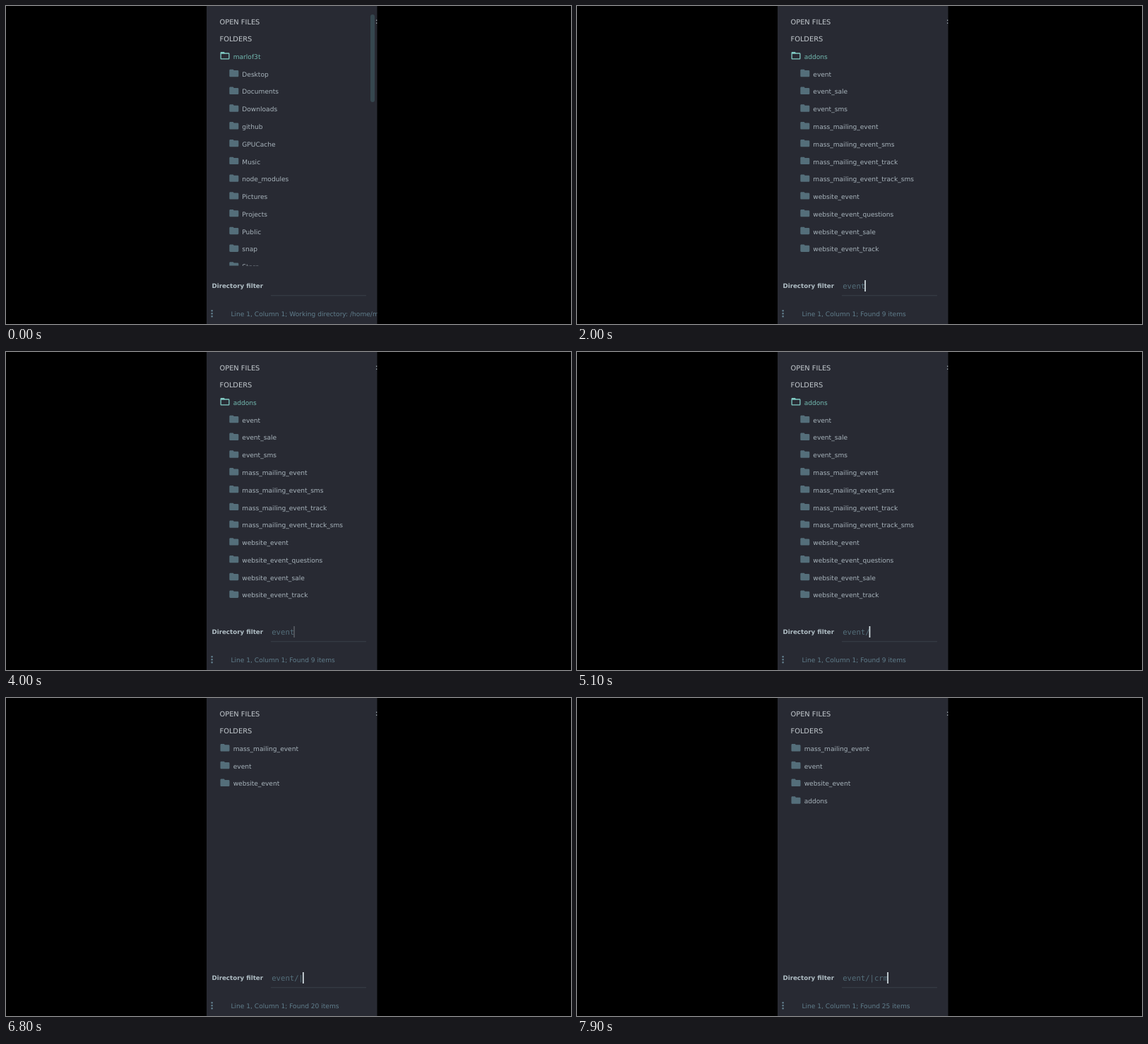
An HTML page with a canvas for the animation above (8 s loop, 800 px wide and 450 px high).

```html
<!DOCTYPE html>
<html lang="en">
<head>
<meta charset="utf-8">
<title>Directory filter</title>
<style>
  html, body { margin: 0; height: 100%; overflow: hidden; background: #000; }
  canvas { display: block; }
</style>
</head>
<body>
<canvas id="stage" width="800" height="450"></canvas>
<script>
const ctx = document.getElementById('stage').getContext('2d');
const LOOP = 8000, STEP = 100;
const ROW = 24.77, FIRST_ROW = 22;
const SANS = '"DejaVu Sans", sans-serif';
const MONO = '"DejaVu Sans Mono", monospace';
const CHAR_WIDTH = 6.4, INPUT_X = 376.2;

const tabShape = 'M10 4H4c-1.1 0-2 .9-2 2v12c0 1.1.9 2 2 2h16c1.1 0 2-.9 2-2V8c0-1.1-.9-2-2-2h-8z';
const closedFolder = new Path2D(tabShape);
const openFolder = new Path2D(tabShape + 'M20 18H4V8h16z');

const eventFolders = ['event', 'event_sale', 'event_sms', 'mass_mailing_event',
  'mass_mailing_event_sms', 'mass_mailing_event_track', 'mass_mailing_event_track_sms',
  'website_event', 'website_event_questions', 'website_event_sale', 'website_event_track'];
const matches = ['mass_mailing_event', 'event', 'website_event'];

// Sidebar contents, each valid from its start time
const views = [
  { at: 0, root: 'marlof3t', scroll: true, status: 'Working directory: /home/marlof3t',
    items: ['Desktop', 'Documents', 'Downloads', 'github', 'GPUCache', 'Music',
      'node_modules', 'Pictures', 'Projects', 'Public', 'snap', 'Store'] },
  { at: 1700, root: 'addons', items: eventFolders, status: 'Found 9 items' },
  { at: 5200, items: matches, status: 'Found 20 items' },
  { at: 6900, scroll: true, status: 'Found 97 items',
    items: [...matches, 'addons', ...eventFolders.filter(name => !matches.includes(name))] },
  { at: 7800, items: [...matches, 'addons'], status: 'Found 25 items' },
];

const typed = 'event/|crm';
const keyTimes = [1200, 1300, 1400, 1600, 1700, 5100, 6700, 7300, 7500, 7700];

function text(str, x, y, size, color, family = SANS, weight = '') {
  ctx.font = `${weight} ${size}px ${family}`;
  ctx.fillStyle = color;
  ctx.fillText(str, x, y);
}

function rect(x, y, w, h, color, radius = 0) {
  ctx.fillStyle = color;
  ctx.beginPath();
  ctx.roundRect(x, y, w, h, radius);
  ctx.fill();
}

function folder(name, row, depth, open) {
  const y = FIRST_ROW + row * ROW;
  ctx.save();
  ctx.translate(302.2 + depth * 12.8, y - 9.1);
  ctx.scale(0.65, 0.65);
  ctx.fillStyle = open ? '#80cbc4' : '#546e7a';
  ctx.fill(open ? openFolder : closedFolder, 'evenodd');
  ctx.restore();
  text(name, 321.7 + depth * 12.6, y + 3.4, 9.08, open ? '#72b8af' : '#a7b3bb');
}

// Smooth blink that restarts at full strength with every key
function caretOpacity(sinceKey) {
  const wave = 0.5 + 0.9 * Math.cos((sinceKey - 250) / 1200 * 2 * Math.PI);
  return sinceKey >= 0 && sinceKey < 250 ? 1 : Math.min(1, Math.max(0, wave));
}

function drawSidebar(view) {
  text('OPEN FILES', 302.5, 25.6, 9.84, '#c3c9ce');
  text('FOLDERS', 302.5, 50.4, 9.84, '#c3c9ce');
  ctx.save();
  ctx.beginPath();
  ctx.rect(284, 0, 242, 367.6);
  ctx.clip();
  const depth = view.root ? 1 : 0;
  if (view.root) folder(view.root, 2, 0, true);
  view.items.forEach((name, i) => folder(name, 2 + depth + i, depth, false));
  ctx.restore();
  if (view.scroll) rect(516, 12, 6, 124, '#35474f', 3);
  for (const y of [19.5, 23.5]) rect(524, y, 1.5, 1.5, '#9aa5ac');
}

function drawInput(t) {
  const count = keyTimes.filter(at => at <= t).length;
  const lastKey = count ? keyTimes[count - 1] : -1000;
  text('Directory filter', 291.4, 399.4, 8.72, '#b0bec5', SANS, 'bold');
  rect(375, 409.3, 135, 1, '#3a3f48');
  text(typed.slice(0, count), INPUT_X, 400, CHAR_WIDTH / 0.602, '#546e7a', MONO);
  ctx.globalAlpha = caretOpacity(t - lastKey);
  rect(INPUT_X - 1 + count * CHAR_WIDTH, 388, 1.7, 16, '#d5e0e5');
  ctx.globalAlpha = 1;
}

function drawStatus(view) {
  for (const y of [431.3, 435.3, 439.3]) rect(290.4, y - 1.2, 2.4, 2.4, '#607d8b', 0.8);
  text('Line 1, Column 1; ' + view.status, 318.5, 438.8, 9.08, '#607d8b');
}

function draw() {
  const t = Math.floor(performance.now() % LOOP / STEP) * STEP;
  const view = views.findLast(v => v.at <= t);
  ctx.textRendering = 'geometricPrecision';
  rect(0, 0, 800, 450, '#000');
  ctx.save();
  ctx.beginPath();
  ctx.rect(284, 0, 241.5, 450);
  ctx.clip();
  rect(284, 0, 242, 450, '#282a33');
  drawSidebar(view);
  drawInput(t);
  drawStatus(view);
  ctx.restore();
  requestAnimationFrame(draw);
}
draw();
</script>
</body>
</html>
```
